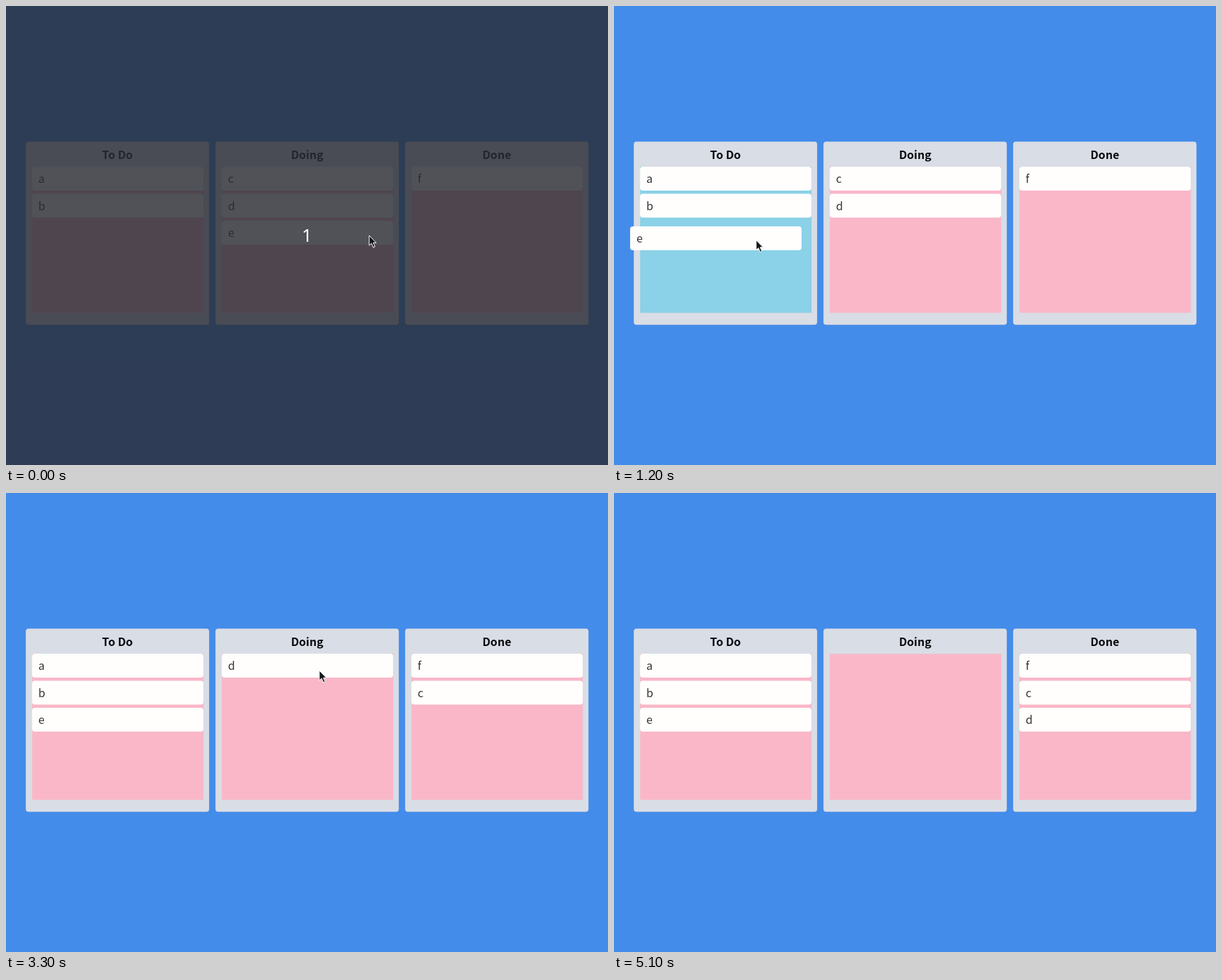
An HTML page that plays this animation: 857x654 px, repeating every 5800 ms.

```html
<!DOCTYPE html>
<html lang="en">
<head>
<meta charset="utf-8">
<title>Task board</title>
<style>
  html, body { margin: 0; width: 100%; height: 100%; overflow: hidden; }
  body { position: relative; background: #448ce9; font: 16px "Noto Sans CJK JP", "Noto Sans CJK SC", "Noto Sans CJK", sans-serif; }
  .column, .list, .card, #cursor, #shade { position: absolute; left: 0; top: 0; }
  .column { width: 261px; height: 261px; border-radius: 4px; background: #d9dde5; }
  .column h2 { margin: 0; font-size: 16px; font-weight: 700; line-height: 37px; text-align: center; color: #08090c; }
  .list { left: 9px; top: 36px; width: 244px; height: 208px; background: #f9b7c8; }
  .list.over { background: #8bd1e7; }
  .card { width: 235px; height: 34px; padding-left: 9px; border-radius: 4px; background: #fffefd; color: #333; font-weight: 300; line-height: 33px; }
  .card.drag { z-index: 1; }
  #shade { right: 0; bottom: 0; z-index: 2; background: rgba(41, 43, 52, .815); color: #fff; font: 26px "Noto Sans", sans-serif; }
  #shade span { position: absolute; left: 0; width: 100%; top: 307px; line-height: 38px; text-align: center; }
  #cursor { z-index: 3; width: 30px; height: 30px; overflow: visible; }
</style>
</head>
<body>
<div id="shade"><span>1</span></div>
<svg id="cursor">
  <path id="arrow" d="M0 0V14.2L3.3 11.2L5.8 17L8.3 15.9L5.8 10.3H10Z" fill="#15171b" stroke="#fff"/>
  <path id="fist" d="M-4.5 6.5V4.5L-6.8 1.5Q-7.3-1.2-4.6-1V-3.5Q-4-5.4-1.8-4.5Q-.2-6.5 1.4-4.6Q3.5-5.6 4.4-3.5Q7-4 6.6-.5Q6.8 2.5 5 4.5V6.5ZM-4.6-1V1M-1.8-4.5V-2.5M1.4-4.6V-2.5M4.4-3.5V-2"
    fill="#fff" stroke="#15171b" stroke-width="1.1" stroke-linejoin="round"/>
</svg>
<script>
const LOOP = 5800, TICK = 100, CARD_WIDTH = 244, PITCH = 270;

const $ = id => document.getElementById(id);
const mix = (a, b, p) => a + (b - a) * p;
const mixPoint = (a, b, p) => a.map((v, i) => mix(v, b[i], p));
const progress = (t, from, to) => Math.min(1, Math.max(0, (t - from) / (to - from)));
const smooth = p => p * p * (3 - 2 * p);
const speedUp = p => p ** 1.5;
const easeOut = p => 1 - (1 - p) ** 3;
const slot = (col, row) => [37.1 + PITCH * col, 229.1 + 38.4 * row];
const move = (el, [x, y]) => { el.style.transform = `translate(${x}px, ${y}px)`; };

function add(parent, tag, cls, text = '') {
  const el = document.createElement(tag);
  el.className = cls;
  el.textContent = text;
  return parent.appendChild(el);
}

const lists = ['To Do', 'Doing', 'Done'].map((name, i) => {
  const column = add(document.body, 'div', 'column');
  move(column, [28.2 + PITCH * i, 193.2]);
  add(column, 'h2', '', name);
  return add(column, 'div', 'list');
});

// A drag carries a card from its slot to `release`; the drop then eases it into `target`.
const cards = [
  { name: 'a', home: [0, 0] },
  { name: 'b', home: [0, 1] },
  { name: 'f', home: [2, 0] },
  { name: 'c', home: [1, 0], drag: {
    lift: 2100, drop: 2600, land: 3000, settle: 3100,
    release: [595, 264], target: [2, 1], grab: [142, 24], ease: smooth, sag: 0 } },
  { name: 'd', home: [1, 1], rise: 2300, drag: {
    lift: 3400, drop: 4000, land: 4300, settle: 4400,
    release: [553, 319], target: [2, 2], grab: [144, 30], ease: smooth, sag: 0 } },
  { name: 'e', home: [1, 2], drag: {
    lift: 400, drop: 1000, land: 1500, settle: 1700,
    release: [3.6, 325], target: [0, 2], grab: [200, 28], ease: speedUp, sag: 14 } }
];
for (const card of cards) card.el = add(document.body, 'div', 'card', card.name);

function homeSlot({ home: [col, row], rise }, t) {
  return slot(col, rise ? row - easeOut(progress(t, rise, rise + 200)) : row);
}

function place(card, t) {
  const start = homeSlot(card, t), d = card.drag;
  if (!d || t < d.lift) return start;
  if (t > d.drop) {
    // The drop starts one tick after the pointer stops.
    const p = progress(t, Math.max(d.drop, d.land - 400), d.land);
    return mixPoint(d.release, slot(...d.target), easeOut(p));
  }
  const p = progress(t, d.lift, d.drop);
  const [x, y] = mixPoint(start, d.release, d.ease(p));
  return [x, y + d.sag * Math.sin(Math.PI * p)];
}

const held = ({ drag: d }, t) => d && t >= d.lift && t <= d.drop;
const grip = (card, t) => place(card, t).map((v, i) => v + card.drag.grab[i]);

// Free pointer stops, joined with the places where each drag begins and ends.
const stops = [
  [300, 517, 327], [1700, 197, 255], [1800, 197, 255], [1900, 516, 271], [2000, 516, 271],
  [3300, 446, 253], [4400, 210, 320], [4700, 163, 286], [5000, 163, 260]
];
for (const card of cards.filter(c => c.drag)) {
  for (const t of [card.drag.lift, card.drag.drop]) stops.push([t, ...grip(card, t)]);
}
stops.sort((a, b) => a[0] - b[0]);

function pointer(t) {
  const i = stops.findIndex(s => s[0] > t);
  const a = stops[i < 0 ? stops.length - 1 : Math.max(0, i - 1)];
  const b = i < 0 ? a : stops[i];
  return mixPoint(a.slice(1), b.slice(1), smooth(progress(t, a[0], b[0] + (a === b))));
}

function listUnder(card, t) {
  const d = card.drag;
  if (t > d.drop) return d.target[0];
  const middle = place(card, t)[0] + CARD_WIDTH / 2;
  return lists.findIndex((_, i) => Math.abs(middle - slot(i, 0)[0] - CARD_WIDTH / 2) <= CARD_WIDTH / 2);
}

function draw(now) {
  const t = Math.floor(now % LOOP / TICK) * TICK;
  const active = cards.find(({ drag: d }) => d && t >= d.lift && t < d.settle);
  const holding = active && held(active, t);
  const over = active ? listUnder(active, t) : -1;

  for (const card of cards) {
    move(card.el, place(card, t));
    card.el.classList.toggle('drag', card === active);
  }
  lists.forEach((list, i) => list.classList.toggle('over', i === over));
  move($('cursor'), holding ? grip(active, t) : pointer(t));
  $('cursor').style.visibility = t < 5100 ? 'visible' : 'hidden';
  $('arrow').style.display = holding ? 'none' : '';
  $('fist').style.display = holding ? '' : 'none';
  $('shade').style.opacity = 1 - progress(t, 0, 200);
}

const start = performance.now();
function frame() {
  draw(performance.now() - start);
  requestAnimationFrame(frame);
}
frame();
</script>
</body>
</html>
```
